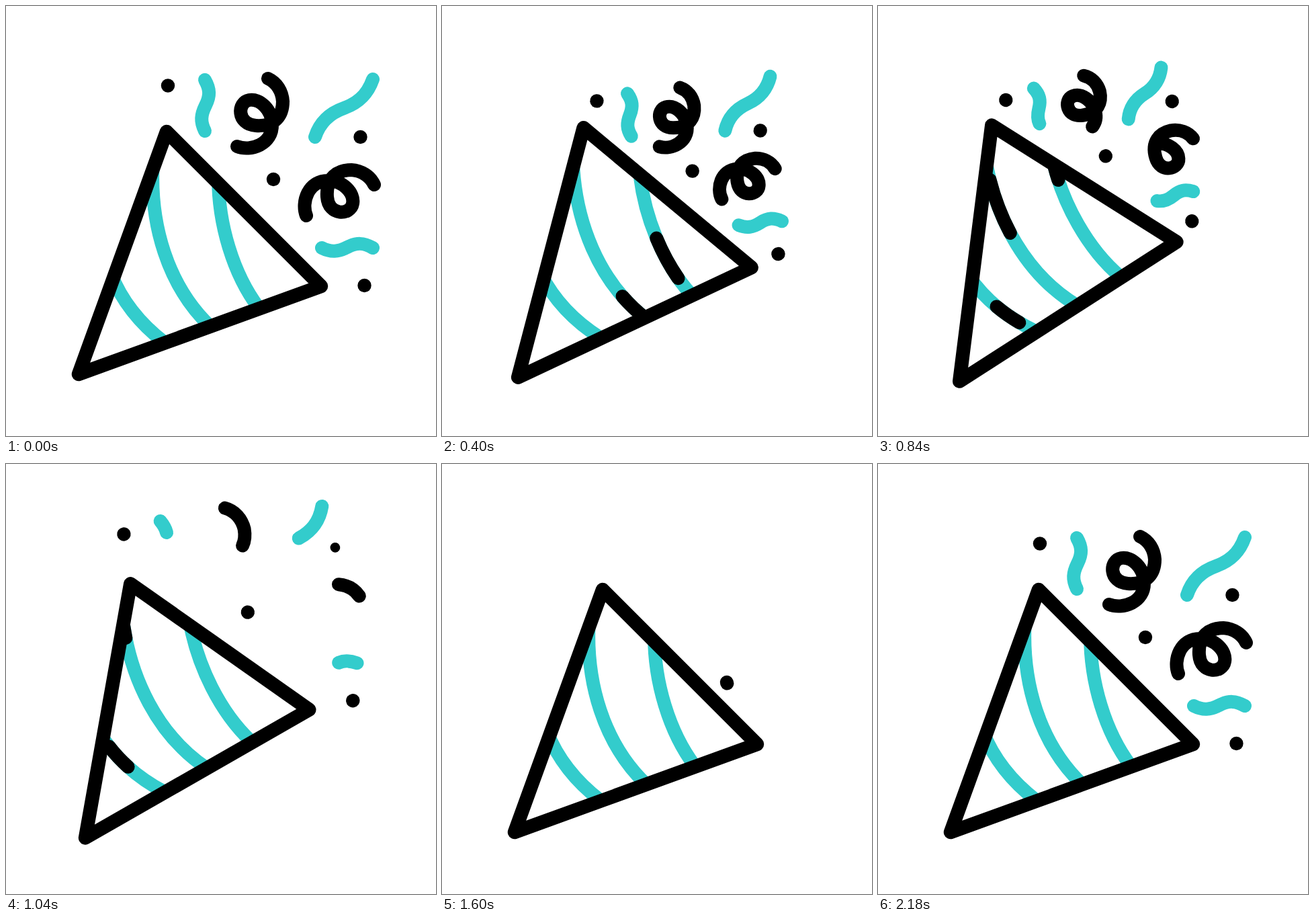
These frames come from a looping animation (640x640 px, 2420 ms). An HTML page:

```html
<!DOCTYPE html>
<html lang="en">
<head>
<meta charset="utf-8">
<title>Party popper</title>
<style>
  html, body { margin: 0; width: 100%; height: 100%; overflow: hidden; background: #fff; }
  svg { display: block; width: 100%; height: 100%; }
  path { fill: none; stroke-width: 20; stroke-linecap: round; stroke-linejoin: round; }
</style>
</head>
<body>
<svg viewBox="0 0 640 640">
  <defs><clipPath id="inside"><path d="M239 187L469 417L108 548Z"/></clipPath></defs>
  <g id="popper">
    <g id="confetti"></g>
    <g id="stripes" clip-path="url(#inside)"></g>
    <path d="M239 187L469 417L108 548Z" stroke="#000" style="stroke-width:20.5"/>
  </g>
</svg>
<script>
const LOOP = 2420, TEAL = '#33cccc', BLACK = '#000';
// the cone turns about PIVOT; confetti shrinks towards HUB and flies away from BURST
const PIVOT = [162, 494], HUB = [375, 310], BURST = [355, 306];
const BACK = 1400, SETTLED = 2185;
const $ = id => document.getElementById(id);

// eased progress from time a to time b
const ease = (t, a, b) => {
  const u = Math.min(1, Math.max(0, (t - a) / (b - a)));
  return u * u * (3 - 2 * u);
};

function add(parent, tag, attrs) {
  const el = document.createElementNS('http://www.w3.org/2000/svg', tag);
  for (const key in attrs) el.setAttribute(key, attrs[key]);
  return parent.appendChild(el);
}

// speed in px per ms; head is the dash start along the path at time 0
const stripes = [
  { d: 'M156 398Q179.5 457.5 236 501', len: 41.5, head: 220.3, speed: 0.1885 },
  { d: 'M219 230C213 325 241 417 304 477', len: 85, head: 394.2, speed: 0.427 },
  { d: 'M316 250C315 325 339 400 376 449', len: 68, head: 240.8, speed: 0.322 }
];
for (const s of stripes) {
  add($('stripes'), 'path', { d: s.d, stroke: TEAL });
  s.el = add($('stripes'), 'path', { d: s.d, stroke: BLACK, 'stroke-dasharray': s.len + ' 1000' });
}

// turn: when a piece stops drawing in and starts flying out; born: when it comes back
const SPIRAL = 'M344 209C364 217 397 206 396 176C396 155 378 137 362 140' +
  'C344 143 343 176 372 178C401 180 412 162 412 142C411 127 403 114 390 108';
const MIRROR = ' matrix(0 -1 -1 0 656 656)';
const ribbons = [
  { d: 'M296 186C289 172 290 162 297 148S304 124 296 110', color: TEAL, turn: 692, born: 1615 },
  { d: 'M460 195C468 170 486 158 503 152S537 135 546 109', color: TEAL, turn: 780, born: 1660 },
  { d: 'M470 360C484 367 494 366 508 359S532 352 546 360', color: TEAL, turn: 730, born: 1640 },
  { d: SPIRAL, color: BLACK, turn: 690, born: 1610 },
  { d: SPIRAL, color: BLACK, turn: 645, born: 1570, flip: MIRROR }
];
for (const r of ribbons)
  r.el = add($('confetti'), 'path', { d: r.d, stroke: r.color, pathLength: 100 });

const dots = [
  { x: 241, y: 118.5, turn: 697, born: 1650 },
  { x: 527.5, y: 195, turn: 648, born: 1630 },
  { x: 398, y: 258, turn: 720, born: 1640 },
  { x: 533.5, y: 416, turn: 745, born: 1660 }
];
for (const p of dots) p.el = add($('confetti'), 'circle', { fill: BLACK });

const tilt = t => -13.04 * ease(t, 0, 920) + 18.04 * ease(t, 920, 1369) - 5 * ease(t, 1369, 1590);

// scale k and shift x, y of a piece; small is its scale when it comes back
function place(piece, t, small) {
  if (t >= BACK) {
    const k = small + (1 - small) * ease(t, piece.born, SETTLED);
    return { k, x: PIVOT[0] * (1 - k), y: PIVOT[1] * (1 - k) };
  }
  const pull = 0.262 * ease(t, 0, piece.turn);
  const fly = 0.45 * ease(t, piece.turn, piece.turn + 560);
  const [x, y] = HUB.map((h, i) => h * pull - BURST[i] * fly);
  return { k: 1 - pull + fly, x, y };
}

function drawRibbon(r, t) {
  const back = t >= BACK;
  const cut = back ? 0 : 100 * ease(t, r.turn + 40, r.turn + 490);
  const end = back ? 100 * ease(t, r.born, SETTLED) : 100;
  const { k, x, y } = place(r, t, 0.92);
  r.el.setAttribute('visibility', end - cut > 0 ? 'visible' : 'hidden');
  r.el.setAttribute('transform', `translate(${x} ${y}) scale(${k})` + (r.flip || ''));
  r.el.style.strokeWidth = 20 / k;
  r.el.setAttribute('stroke-dasharray', cut || end < 100 ? `${end - cut} 300` : 'none');
  r.el.setAttribute('stroke-dashoffset', -cut);
}

function drawDot(p, t) {
  const { k, x, y } = place(p, t, 0.39);
  const size = t >= BACK ? ease(t, p.born, p.born + 70) : 1 - ease(t, p.turn + 340, p.turn + 490);
  p.el.setAttribute('cx', x + p.x * k);
  p.el.setAttribute('cy', y + p.y * k);
  p.el.setAttribute('r', 10.2 * size);
}

function draw(t) {
  $('popper').setAttribute('transform', `rotate(${tilt(t)} ${PIVOT})`);
  for (const s of stripes) s.el.setAttribute('stroke-dashoffset', s.speed * t - s.head);
  for (const r of ribbons) drawRibbon(r, t);
  for (const p of dots) drawDot(p, t);
}

const start = performance.now();
function tick() {
  const t = (performance.now() - start) % LOOP;
  draw(Math.floor(t / 20) * 20);
  requestAnimationFrame(tick);
}
tick();
</script>
</body>
</html>
```
